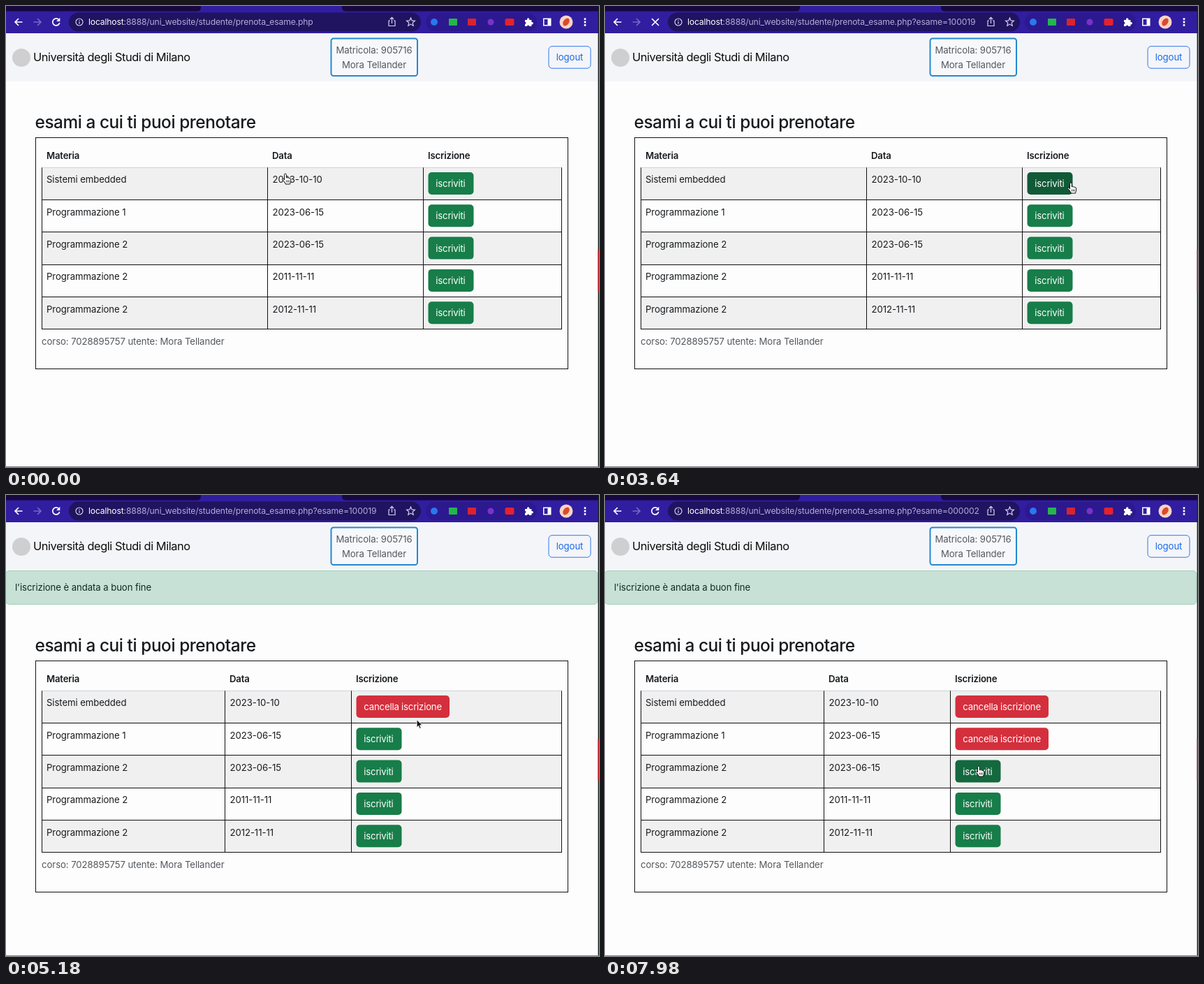
An HTML page for the animation above (8 s loop, 849x660 px).

```html
<!DOCTYPE html>
<html lang="it">
<head>
<meta charset="utf-8">
<title>Prenota esame</title>
<style>
  html, body { margin: 0; width: 100%; height: 100%; overflow: hidden; background: #fdfdfd; }
  svg { display: block; width: 100%; height: 100%; }
  text {
    font: 400 13.2px Inter, Roboto, sans-serif;
    font-optical-sizing: none;
    letter-spacing: -.007em;
    fill: #181b1e;
    white-space: pre;
  }
  .head { font-weight: 600; letter-spacing: -.014em; }
  .title { font-size: 24.4px; font-weight: 500; letter-spacing: -.018em; }
  .brand { font-size: 16.4px; letter-spacing: -.027em; fill: #0c0c0c; }
  .muted { fill: #53575c; }
  .mid { text-anchor: middle; }
  .btn text { fill: #fff; letter-spacing: -.015em; }
  .book { fill: #177d49; }
  .book.hover { fill: #14683e; }
  .book.down { fill: #115a37; }
  .cancel { fill: #d42f3d; }
  .cancel.hover { fill: #b52a36; }
  .url { font-size: 12.2px; letter-spacing: -.014em; fill: #b3abda; }
  .url .host { fill: #fff; }
  .icon { fill: none; stroke: #fff; stroke-width: 1.7; }
  .thin { stroke: #d5d0ee; stroke-width: 1.2; }
  .line { fill: none; stroke: #111; }
  .hidden { display: none; }
</style>
</head>
<body>
<svg viewBox="0 0 849 660" preserveAspectRatio="none">
  <rect width="849" height="660" fill="#fdfdfd"/>

  <g id="navbar">
    <rect y="38" width="848" height="70" fill="#f4f5f9"/>
    <circle cx="22" cy="74" r="13" fill="#cfcfd1"/>
    <text class="brand" x="39" y="78.500">Università degli Studi di Milano</text>
    <rect x="465.500" y="46.500" width="123.500" height="53.500" rx="3.500" fill="#f7f8fb" stroke="#2389d0" stroke-width="2"/>
    <text class="muted mid" x="527" y="68.300">Matricola: 905716</text>
    <text class="muted mid student" x="527" y="88.500"></text>
    <rect x="777" y="57.700" width="60" height="31.500" rx="5" fill="none" stroke="#2f78ee"/>
    <text class="mid" x="807" y="78.300" style="fill:#1769ea">logout</text>
  </g>

  <g id="toolbar">
    <rect width="849" height="39" fill="#311da0"/>
    <path d="M0 0H279V2Q279 7.500 273 7.500H0zM481 0H849V7.500H487Q481 7.500 481 2z" fill="#17083f"/>
    <rect x="90" y="9.500" width="504" height="27" rx="13.500" fill="#20135f"/>
    <rect x="601" y="10" width="159" height="26" rx="13" fill="#2c198f"/>
    <path class="icon" d="M23.500 23H13M18 18l-5 5 5 5"/>
    <path class="icon" d="M39.500 23H50M45 18l5 5-5 5" style="stroke:#7767c4"/>
    <g id="reload"><path class="icon" d="M75.500 19.500A5 5 0 1 0 76.700 24"/><path d="M77.300 16.800V22h-5.200z" fill="#fff"/></g>
    <path id="stop" class="icon" d="M67 18l10 10M77 18l-10 10"/>
    <circle class="icon thin" cx="105" cy="23" r="5"/>
    <path class="icon thin" d="M105 22.300v3.500M105 20v1.200"/>
    <text class="url" x="118" y="27.300"><tspan class="host">localhost</tspan>:8888/uni_website/studente/prenota_esame.php<tspan id="query"></tspan></text>
    <path class="icon thin" d="M550 21h-2v7.500h9V21h-2M552.500 25v-8.500M549.800 19l2.700-2.700 2.700 2.700"/>
    <path class="icon thin" d="M579.500 17l1.700 3.900 4.200.4-3.200 2.800 1 4.200-3.700-2.200-3.700 2.200 1-4.200-3.200-2.800 4.200-.4z"/>
    <circle cx="613" cy="23" r="5" fill="#2878ee"/>
    <rect x="634" y="18" width="12" height="10" rx="1" fill="#25b64c"/>
    <rect x="661" y="18" width="12" height="10" rx="1" fill="#d9232e"/>
    <circle cx="694" cy="23" r="4.500" fill="#7b32c8"/>
    <rect x="714.500" y="18" width="13" height="10" rx="2" fill="#e4222e"/>
    <path d="M743 20h3v-1a1.700 1.700 0 0 1 3.400 0v1h3v3h.8a1.700 1.700 0 0 1 0 3.400h-.8v2.600h-3.200a1.600 1.600 0 0 0-3.200 0h-3v-3.200a1.500 1.500 0 0 0 0-3z" fill="#fff"/>
    <path d="M769 17.500h11.500v11H769zM770.500 19v8h5v-8z" fill="#fff" fill-rule="evenodd"/>
    <circle cx="802" cy="23" r="9.500" fill="#f6d5c4"/>
    <ellipse cx="802" cy="23" rx="4" ry="6" fill="#dc4a2d" transform="rotate(35 802 23)"/>
    <path d="M829 17.300v2.800M829 21.600v2.800M829 25.900v2.800" stroke="#fff" stroke-width="2.600"/>
  </g>

  <g id="before"></g>
  <g id="after">
    <rect x="-.5" y="108.500" width="847.500" height="48" rx="5" fill="#c7e1d6" stroke="#a1cfba"/>
    <text x="13" y="137.300" style="fill:#14291f">l'iscrizione è andata a buon fine</text>
  </g>

  <path d="M848.300 0V660" stroke="#1b2522" stroke-width="1.400"/>
  <path d="M848.300 349V409" stroke="#c9151e" stroke-width="1.400"/>
  <path d="M0 659.500H849" stroke="#85858a"/>

  <g id="cursor">
    <g id="hand" stroke="#111" stroke-linejoin="round">
      <path fill="#fff" d="M-1.500 9V1.500a1.400 1.400 0 0 1 2.800 0V6l1-.5 1.600.6.8-.2 1.300.8.9.2.8 1.200v3l-1 3V15H0v-1l-2-3-2.400-2.500q-.4-1.500 1.200-1.500z"/>
      <path d="M1.500 9.500v3M3.500 9.500v3M5.300 9.500v3" stroke-width=".8"/>
    </g>
    <path id="arrow" d="M0 0V11l2.500-2.400 1.700 4 1.900-.8-1.700-3.900H8z" fill="#111" stroke="#fff" stroke-width=".8"/>
  </g>
</svg>
<script>
const LOOP = 8000;
const STUDENT = 'Mora Tellander';
const ROW_HEIGHT = 46.3;
const EXAMS = [
  ['Sistemi embedded', '2023-10-10'],
  ['Programmazione 1', '2023-06-15'],
  ['Programmazione 2', '2023-06-15'],
  ['Programmazione 2', '2011-11-11'],
  ['Programmazione 2', '2012-11-11']
];
// Each request: button pressed, loading starts, address changes, page replaced.
const REQUESTS = [
  { row: 0, press: 3300, load: 3450, address: 3500, done: 3760, query: '?esame=100019' },
  { row: 1, press: 6720, load: 6800, address: 7050, done: 7200, query: '?esame=000002' }
];
// Pointer stops: time, x, y.
const PATH = [
  [0, 400, 240], [40, 400, 240], [820, 656, 252], [2500, 656, 252],
  [3240, 667, 253], [3780, 667, 253], [4400, 657, 288], [4700, 657, 288],
  [5500, 551, 340], [6200, 551, 340], [6650, 549, 343], [7250, 549, 343],
  [7750, 535, 388], [LOOP, 535, 388]
];

const $ = id => document.getElementById(id);
const show = (id, on) => $(id).classList.toggle('hidden', !on);
const text = (x, y, content, cls = '') => `<text class="${cls}" x="${x}" y="${y}">${content}</text>`;

function buildPage(id, dy, dateX, actionX) {
  const top = 231.3 + dy, bottom = top + 5 * ROW_HEIGHT;
  let rows = '', rules = '', buttons = '';
  EXAMS.forEach(([name, date], i) => {
    const y = top + i * ROW_HEIGHT;
    if (i % 2 === 0) rows += `<rect x="51" y="${y}" width="744.5" height="${ROW_HEIGHT}" fill="#f0f0f0"/>`;
    rows += text(58, y + 22, name) + text(dateX + 7, y + 22, date);
    rules += `M51 ${Math.floor(y + ROW_HEIGHT) + .5}H796`;
    buttons += `<g class="btn"><rect x="${actionX + 7}" y="${y + 6.7}" height="32" rx="5"/>` +
      text(actionX + 17.8, y + 27.6, '') + '</g>';
  });
  for (const x of [51.5, dateX, actionX, 795.5]) rules += `M${x} ${top}V${bottom}`;
  $(id).insertAdjacentHTML('beforeend',
    text(41.5, 175 + dy, 'esami a cui ti puoi prenotare', 'title') +
    `<rect class="line" x="42.5" y="${188.5 + dy}" width="762" height="331"/>` +
    text(58, 218.6 + dy, 'Materia', 'head') +
    text(dateX + 6.5, 218.6 + dy, 'Data', 'head') +
    text(actionX + 6.5, 218.6 + dy, 'Iscrizione', 'head') +
    rows + `<path d="M51 ${top}H796" stroke="#cfd0d8"/><path class="line" d="${rules}"/>` + buttons +
    text(51, 485 + dy, `corso: 7028895757 utente: ${STUDENT}`, 'muted'));
  return [...$(id).querySelectorAll('.btn')].map((group, row) => ({
    shape: group.firstChild, label: group.lastChild,
    left: actionX + 7, top: top + row * ROW_HEIGHT + 6.7
  }));
}

function pointerAt(t) {
  const i = Math.max(1, PATH.findIndex(p => p[0] > t));
  const [t0, x0, y0] = PATH[i - 1], [t1, x1, y1] = PATH[i];
  const u = (t - t0) / (t1 - t0), k = u * u * (3 - 2 * u);
  return [x0 + (x1 - x0) * k, y0 + (y1 - y0) * k];
}

document.querySelector('.student').textContent = STUDENT;
const before = buildPage('before', 0, 374.5, 597.5);
const after = buildPage('after', 49, 313.5, 494.5);

function render(t) {
  const [x, y] = pointerAt(t);
  const booked = REQUESTS.filter(r => t >= r.done).map(r => r.row);
  const pressed = REQUESTS.find(r => t >= r.press && t < r.done);
  const loading = REQUESTS.some(r => t >= r.load && t < r.done);
  const address = REQUESTS.filter(r => t >= r.address).pop();
  let overButton = false;

  (booked.length ? after : before).forEach((button, row) => {
    const cancel = booked.includes(row);
    const width = cancel ? 133.5 : 65;
    const hover = x >= button.left && x <= button.left + width && y >= button.top && y <= button.top + 32;
    const down = pressed && pressed.row === row;
    overButton = overButton || hover;
    button.shape.setAttribute('width', width);
    button.shape.setAttribute('class', `${cancel ? 'cancel' : 'book'} ${down ? 'down' : hover ? 'hover' : ''}`);
    button.label.textContent = cancel ? 'cancella iscrizione' : 'iscriviti';
  });

  const hand = overButton || t < 100;
  show('before', !booked.length);
  show('after', booked.length);
  show('stop', loading);
  show('reload', !loading);
  show('hand', hand);
  show('arrow', !hand);
  $('query').textContent = address ? address.query : '';
  $('cursor').setAttribute('transform', `translate(${x} ${y})`);
}

const start = performance.now();
function tick() {
  render((performance.now() - start) % LOOP);
  requestAnimationFrame(tick);
}
tick();
</script>
</body>
</html>
```
